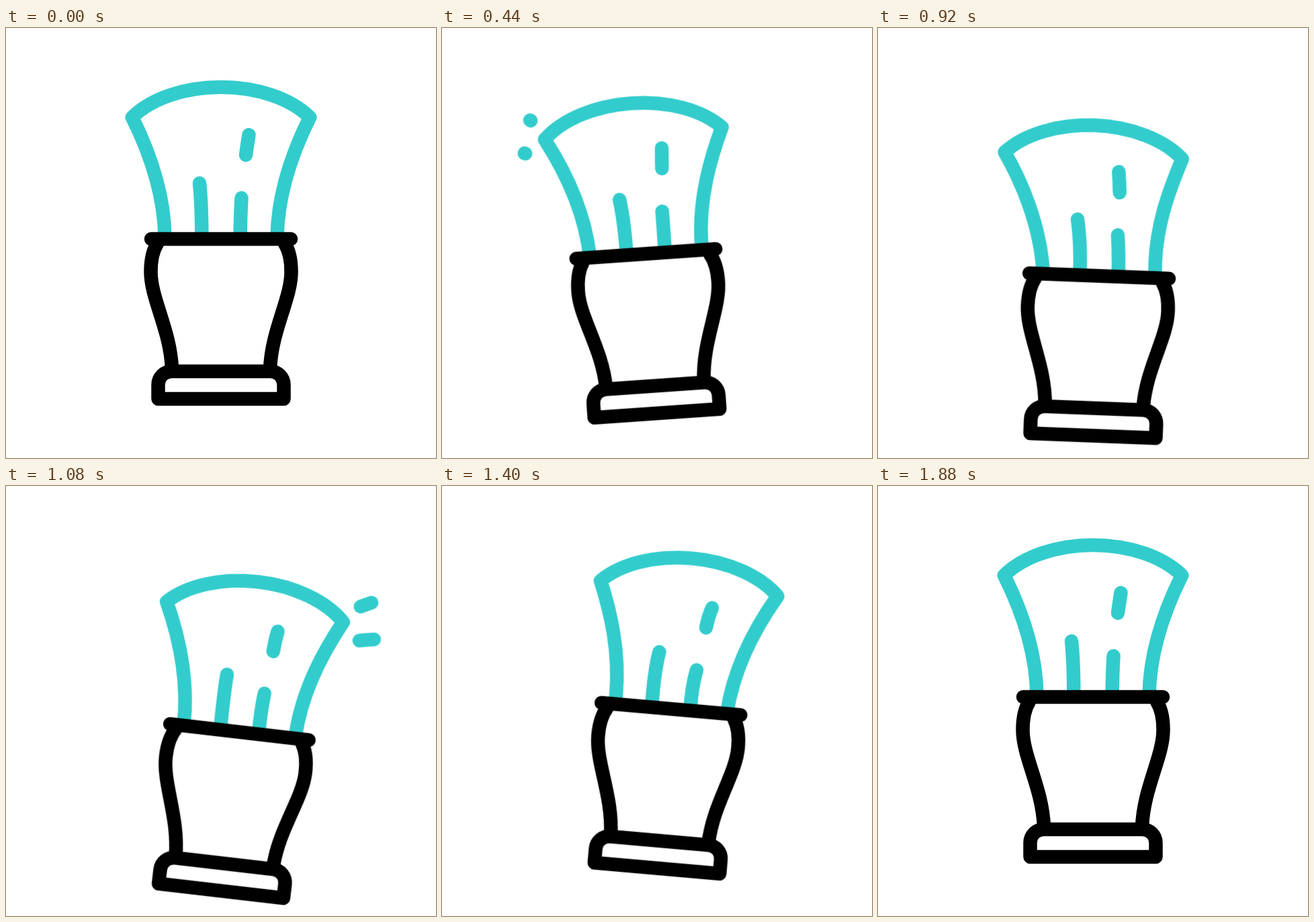
Animation, 640 px wide and 640 px high, one loop 2.04 s. Source, as an HTML page:

```html
<!DOCTYPE html>
<html lang="en">
<head>
<meta charset="utf-8">
<title>Shaving brush</title>
<style>
  html, body { margin: 0; width: 100%; height: 100%; overflow: hidden; background: #fff; }
  svg { display: block; width: 100%; height: 100%; }
  svg * { animation-duration: 2040ms; animation-iteration-count: infinite; }

  .line { fill: none; stroke-width: 20.5; stroke-linecap: round; stroke-linejoin: round; }
  .bristles, .drops { stroke: #3cc; }
  .handle { stroke: #000; }

  .lift { animation-name: lift; }
  .swing { animation-name: swing; transform-origin: 320px 552px; }
  .bristles path { d: var(--rest); animation-name: bend; }
  .drops path { stroke-dasharray: 0 9; opacity: 0; animation-name: spray, show; animation-timing-function: linear, step-end; }
  .drops .late { animation-delay: -1476ms; }

  @keyframes lift {
    0%, 3.92% { transform: translateY(0); animation-timing-function: cubic-bezier(.56, 0, .37, 1); }
    45.1% { transform: translateY(54.8px); animation-timing-function: cubic-bezier(.435, 0, .475, 1); }
    86.27%, 100% { transform: translateY(0); }
  }
  @keyframes swing {
    0%, 3.92%, 86.27%, 100% { transform: rotate(0deg); animation-timing-function: cubic-bezier(.333, 0, .55, 1); }
    31.37% { transform: rotate(-5.1deg); animation-timing-function: cubic-bezier(.333, 0, .55, 1); }
    58.82% { transform: rotate(7.6deg); animation-timing-function: cubic-bezier(.333, 0, .55, 1); }
  }
  /* The bristles trail the swing by three ticks of 40 ms. */
  @keyframes bend {
    0%, 9.8%, 92.16%, 100% { d: var(--rest); animation-timing-function: cubic-bezier(.58, 0, .45, 1); }
    37.25% { d: var(--left); animation-timing-function: cubic-bezier(.56, 0, .39, 1); }
    64.71% { d: var(--right); animation-timing-function: cubic-bezier(.56, 0, .39, 1); }
  }
  /* The head of each drop runs ahead and its tail catches up. */
  @keyframes spray {
    0%, 21.37% { stroke-dasharray: 0 9; stroke-dashoffset: 0; }
    25.29% { stroke-dasharray: .392 9; stroke-dashoffset: 0; }
    31.37% { stroke-dasharray: .354 9; stroke-dashoffset: -.646; }
    34.71%, 100% { stroke-dasharray: 0 9; stroke-dashoffset: -1; }
  }
  @keyframes show {
    0% { opacity: 0; }
    21.37% { opacity: 1; }
    34.71%, 100% { opacity: 0; }
  }

  .fan {
    --rest: path("M236.5 312C235.5 237 207.5 172.5 187.8 133C216 105 266 88 320 88C374 88 424 105 452.2 133C432.5 172.5 404.5 237 403.5 312");
    --left: path("M236.5 312C228 240 194.5 175 168.4 135.7C196.6 107.7 246.6 90.7 300.6 90.7C354.6 90.7 404.6 107.7 432.8 135.7C419.5 175 396.5 240 403.5 312");
    --right: path("M236.5 312C239.5 237 215.5 172.5 199.3 133C227.5 105 277.5 88 331.5 88C385.5 88 435.5 105 463.7 133C440.5 172.5 408.5 237 403.5 312");
  }
  .strand-a {
    --rest: path("M288 231Q291.3 262 291.3 312");
    --left: path("M283 231Q291 265 291.3 312");
    --right: path("M295.5 231Q290 262 291.3 312");
  }
  .strand-b {
    --rest: path("M350.5 253Q349 278 348.5 312");
    --left: path("M344.3 252Q348 278 348.7 312");
    --right: path("M353 253Q348 278 348.5 312");
  }
  .dash {
    --rest: path("M361.5 159Q359 174 357 189");
    --left: path("M339.5 158Q342 172 343.4 189");
    --right: path("M368 159Q363.5 172 361.6 189");
  }
</style>
</head>
<body>
<svg viewBox="0 0 640 640">
  <g class="lift">
    <g class="swing">
      <g class="line drops">
        <path pathLength="1" d="M162.8 104.4Q143 91 119.1 80.5"/>
        <path pathLength="1" d="M151.5 152.8Q120 142 90.9 143.2"/>
        <path class="late" pathLength="1" d="M477.5 107.9Q494 99 518 90"/>
        <path class="late" pathLength="1" d="M481.4 158.3Q507 152 537 151"/>
      </g>
      <g class="line bristles">
        <path class="fan"/>
        <path class="strand-a"/>
        <path class="strand-b"/>
        <path class="dash"/>
      </g>
      <g class="line handle">
        <path d="M216 314H424"/>
        <path d="M225 321C218 332 215.5 346 215.5 363C215.5 403 245 450 247 508"/>
        <path d="M415 321C422 332 424.5 346 424.5 363C424.5 403 395 450 393 508"/>
        <path d="M226.5 552V531a20 20 0 0 1 20-20H393.5a20 20 0 0 1 20 20V552Z"/>
      </g>
    </g>
  </g>
</svg>
</body>
</html>
```
